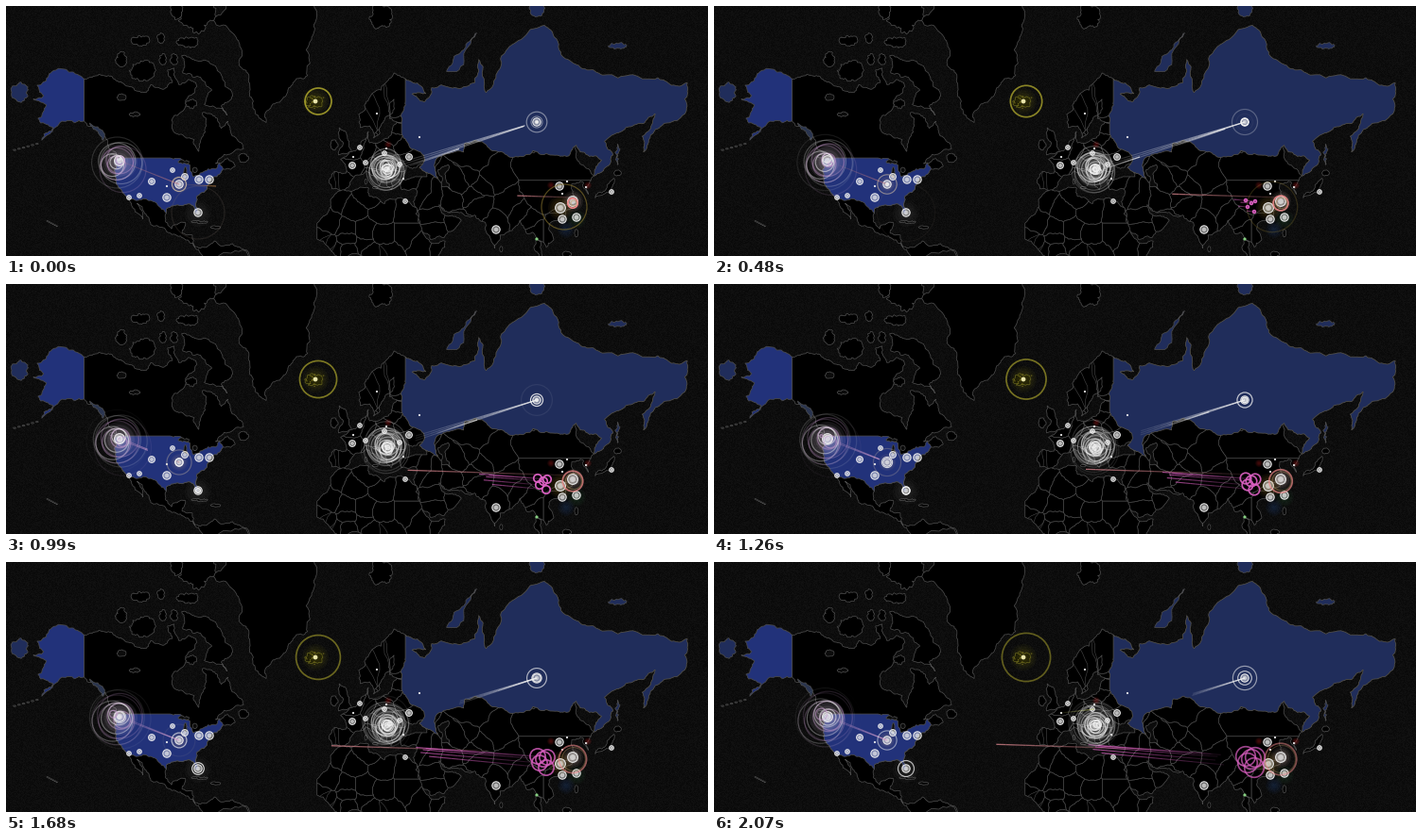
A matplotlib script for the animation above (2160 ms loop, 742x265 px).

```python
import numpy as np
import matplotlib.pyplot as plt
from matplotlib.animation import FuncAnimation
from matplotlib.collections import LineCollection
from matplotlib.colors import to_rgba
from matplotlib.patches import Circle, Polygon

W, H, DPI = 742, 265, 100
STEP, COUNT = 30, 72
PX = 72 / DPI
SEA, LAND, EDGE = "#0c0c0c", "#000000", "#4c4c4c"
RUSSIA, USA = "#202d5b", "#22327a"
WHITE, PINK, LILAC = "#f2f2f2", "#d95fc0", "#c79bcd"
GROWTH = 5.6  # ring growth in px per second

rng = np.random.default_rng(7)
fig = plt.figure(figsize=(W / DPI, H / DPI), dpi=DPI, facecolor=SEA)
ax = fig.add_axes([0, 0, 1, 1])
ax.set_xlim(0, W)
ax.set_ylim(H, 0)
ax.axis("off")
grain = rng.integers(9, 18, (H, W)).astype(np.uint8)
ax.imshow(np.dstack([grain] * 3), extent=(0, W, H, 0), aspect="auto",
          interpolation="nearest", zorder=0)


def project(flat):
    """Mercator, from lon, lat, lon, lat, ... to stage pixels."""
    lon, lat = np.reshape(flat, (-1, 2)).T
    y = 273 - 113.8 * np.arcsinh(np.tan(np.radians(lat)))
    return np.column_stack([5 + (lon + 180) * 715 / 360, y])


def rough(pts, amp):
    """Bend segments by midpoints; the same ends always bend the same way."""
    for _ in range(4):
        out = [pts[0]]
        for p, q in zip(pts[:-1], pts[1:]):
            d = q - p
            size = np.hypot(*d)
            if size > 2.5 and np.abs(d).min() > 1e-6:
                k = 13.7 * (p[0] + q[0]) + 7.9 * (p[1] + q[1])
                off = np.array([np.sin(k), np.cos(1.7 * k)])
                out.append((p + q) / 2 + amp * size * off)
            out.append(q)
        pts = np.array(out)
    return pts


def land(*flat, fill=LAND, edge=EDGE, amp=0.16):
    pts = project(flat)
    patch = Polygon(rough(np.vstack([pts, pts[:1]]), amp), facecolor=fill,
                    edgecolor=edge, linewidth=0.75 * PX, zorder=1)
    return ax.add_patch(patch)


def isle(lon, lat, w, h, **style):
    a = np.arange(9) * 2 * np.pi / 9 + 0.3
    land(*np.column_stack([lon + w * np.cos(a), lat + h * np.sin(a)]).ravel(),
         amp=0.24, **style)


# --- the Americas
north = (-141, 69.7, -128, 70.3, -124, 69.4, -115, 68, -108, 67, -105.5, 68.6,
         -98, 67.8, -94, 69, -96.5, 71.3, -93, 71.6, -90.5, 68.6, -85.5, 69.6,
         -81.5, 69, -82, 67, -87, 65.3, -94.4, 60.5, -92.5, 57, -82.3, 55,
         -80, 51.2, -79, 54.6, -76.5, 57.2, -78, 62.4, -70, 61, -68, 58.3,
         -64.5, 60.3, -60, 55.5, -56, 52.2, -66.5, 50.2, -71, 47, -64.5, 48.8,
         -60.5, 46, -67, 45)
east = (-67, 45, -70.5, 42, -74, 40.5, -76, 36.5, -81.2, 31.5, -80.3, 25.3,
        -83, 29.5, -89.5, 29.6, -97.2, 28, -97.2, 25.9)
central = (-97.7, 22, -94.5, 18.2, -90.4, 21, -87, 21.3, -88.8, 16, -83.3, 15,
           -82, 9, -77, 8.6, -71.5, 12, -62, 10.6, -51, 3, -78, 2, -80, 7.5,
           -87.5, 13, -95, 16, -105.5, 20.3, -112.8, 30.5, -109.8, 23, -115, 28.5)
west = (-117.1, 32.5, -122.5, 37.5, -124.3, 42, -124.5, 48.3, -123, 49)
coast = (-128, 52.5, -133.5, 58, -141, 60.3)
lakes = (-123, 49, -95.2, 49, -84.6, 46.4, -82.5, 42, -75, 45, -70.5, 45.2,
         -69, 47.3)
land(*north, *east, *central, *west, *coast)
land(*lakes, *east, -101.5, 29.5, -106.5, 31.8, -114.8, 32.5, *west, fill=USA)
land(-141, 69.7, -141, 60.3, -151, 60.2, -163.5, 54.8, -157.5, 58.6,
     -165.5, 61, -161, 64.3, -168, 65.6, -162.5, 66.4, -166, 68.5, -157, 71.2,
     fill=USA)
land(-138, 59.8, -130, 56, -131, 54.8, -136, 58, fill="#2a3550")
land(-73, 78.2, -58.5, 75.4, -54, 70.8, -53, 66.5, -49.5, 62, -44, 59.9,
     -40.5, 64.5, -32, 68, -22, 70.3, -19, 76.5, -18, 81, -65, 81)
land(-65, 61.8, -77, 64.4, -73, 67.5, -79, 70, -88.5, 70.8, -89, 73.6,
     -78, 72.8, -67, 69.5, -62, 66.6, -68, 64)

# --- Europe, Asia, Africa
norse = (30, 69.7, 24, 70.8, 13, 67, 5.2, 62, 6, 58.5, 11, 59, 13, 55.5,
         16.5, 57, 18.5, 60.3, 24, 65.6, 21.5, 61, 29, 60, 23.5, 59, 21, 55.5,
         11, 54, 10.4, 57.5, 8.4, 55)
south = (3.5, 51.4, -4.5, 48.5, -1.3, 45, -1.6, 43.4, -9.2, 43, -9, 37,
         -2, 36.8, 3.3, 42.5, 9, 44.3, 16, 38.2, 18.4, 40, 12.4, 44.8,
         19.4, 42, 22.5, 36.6, 23, 40.5, 29, 41, 30.5, 46, 39, 47, 41.5, 42,
         35, 42, 26.5, 40, 28, 36.7, 36, 36.5, 34.3, 31.3)
asia = (34.9, 29.5, 43.3, 12.8, 55, 17.2, 59.8, 22.5, 51.5, 24.7, 48, 30,
        57, 26.5, 67, 25, 72.7, 21, 77.5, 8.1, 80.3, 15, 91, 22.5, 94.5, 16,
        97.5, 16.5, 98.5, 8, 103.5, 2, 100, 13.3, 105, 8.7, 109, 12.5,
        106.5, 20.5, 114, 22.3, 121.8, 30, 119, 35, 118.5, 39, 124.5, 40,
        127.5, 34.7, 128, 39.5, 130.6, 42.3)
eurasia = land(*norse, *south, *asia, 120, 55, 60, 58, 33, 62.8)
africa = land(-6, 35.8, 10.5, 37.2, 11, 33.7, 19, 30.4, 22, 32.7, 32.3, 31.2,
              37, 21.5, 43, 11.6, 51.2, 11.8, 46, 1, 9.5, 1, 5, 5, -7.5, 4.4,
              -17, 13, -17, 21, -9.7, 31)
siberia = (130.6, 42.3, 135.5, 44.3, 140.5, 50, 136, 54.5, 153, 59.4,
           163, 62.2, 156, 56, 156.7, 51, 163, 58, 179.5, 62.8, 180, 69,
           160, 69.7, 130, 71.3, 113, 73.7, 104, 77.6, 81, 73.5, 73, 67,
           69, 73, 67, 69, 44, 68, 40, 65, 33.5, 66.7, 41, 66.8, 30, 69.7)
frontier = (30, 65, 28, 60, 28, 57, 32, 53, 40, 49.5, 37.5, 45.5, 47.5, 41.5,
            47, 49, 61, 51, 62, 54, 71, 54.3, 80, 51, 87, 49.2, 98, 51.5,
            107, 50, 117, 49.7, 121, 53.3, 127, 50, 134.5, 48.2)
land(*siberia, *frontier, fill=RUSSIA, edge="#55524a", amp=0.13)
land(52, 71, 56, 73.5, 68, 76.7, 56, 71, fill=RUSSIA)
land(47.3, 44.6, 53, 46.5, 51, 43, 53.8, 37, 49.3, 38, fill=SEA)
land(-5.5, 50, 1.3, 51.2, -2, 57.5, -5, 58.5, -3, 54, -5, 52)
land(141, 41.4, 140.5, 35.5, 131, 33, 136, 36)

for spot in ((-110, 71, 7, 1.8), (-121, 73, 3, 1.2), (-99, 73, 2, .9),
             (-93, 73, 2, .9), (-86, 75.5, 6, .7), (-81, 79, 9, 2.3),
             (-92, 79.5, 3, 1.3), (-111, 75.7, 5, .7), (-100, 76, 2, .7),
             (-84, 64.5, 3, 1), (-56, 49, 2.6, 1.6), (-126, 49.6, 1.6, .6),
             (-79.5, 21.7, 4.5, .7), (-71, 19, 2.7, .7), (17, 78.5, 6, 1.3),
             (-8, 53.3, 1.9, 1.6), (9, 40, .6, 1.1), (14, 37.5, 1.5, .5),
             (143, 43.4, 2, 1.1), (121, 23.7, .6, 1.2), (81, 7.7, .8, 1.5),
             (121, 16, 1, 2), (116, 5, 2.5, 1.5)):
    isle(*spot)
for spot in ((143, 50, .6, 3.6), (100, 79.3, 4, .8), (143, 75, 5, .4),
             (-175, 67, 4.5, 2)):
    isle(*spot, fill=RUSSIA)
for spot in ((-88, 47.6, 3, .7), (-87, 44, .8, 1.8), (-82, 44.6, 1.3, 1),
             (-114, 62, 3, .6), (-121, 66, 2.5, .7)):
    isle(*spot, fill=SEA)
for k in range(6):
    isle(-166 - 2.4 * k, 53.7 - .4 * k, .7, .2)
    isle(-155.5 - k, 19.6 + .5 * k, .4, .2)
isle(-18.8, 65, 4.8, 1.4, fill="#0a0a02", edge="#5b5a1c")


# --- country borders: cells around the middle of each country
def cell(site, others):
    """Polygon of all points nearer to site than to any of the others."""
    poly = site + np.array([(-1, -1), (1, -1), (1, 1), (-1, 1)]) * 90
    for o in others:
        n, mid = o - site, (o + site) / 2
        side = (poly - mid) @ n
        out = []
        for p, q, a, b in zip(poly, np.roll(poly, -1, 0), side, np.roll(side, -1)):
            if a <= 0:
                out.append(p)
            if a * b < 0:
                out.append(p + (q - p) * a / (a - b))
        poly = np.array(out)
    return np.vstack([poly, poly[:1]])


europe = (-8, 39.7, -4, 40, 2.5, 46.8, 4.5, 52, 10, 51, 13, 42.5, 14, 47.5,
          15.5, 49.8, 19.5, 52, 19.3, 47, 25, 46, 20.5, 44, 25.3, 42.7, 22, 39.5,
          24, 55.5, 25.5, 58.5, 28, 53.5, 31, 49, 9, 61.5, 16, 62.5, 26.5, 63.5)
orient = (33, 39, 38, 35, 43.5, 33, 45, 24, 48, 16, 57, 21, 54, 32.5, 59, 39.5,
          64, 42, 67, 48, 74.5, 41.3, 70, 38.7, 66, 34, 69, 29.5, 79, 22,
          84, 28.3, 90, 24, 96, 21, 101, 16, 106, 16, 104, 34, 104, 46.5)
sahara = (-6, 32, 3, 28, 9.5, 34, 17.5, 27, 30, 26.5, -10, 20.5, -2, 17.5,
          9, 17.5, 18.5, 15.5, 30, 15.5, 39, 8.5, 46, 6, 8, 9.5, 12.5, 5.5,
          20.5, 6.5, -11, 10.5, -5.5, 7.5, -1, 8, -1.5, 12.3, -14.5, 14.5)
for region, table in ((eurasia, europe + orient), (africa, sahara)):
    sites = project(table)
    for k, site in enumerate(sites):
        pts = rough(cell(site, np.delete(sites, k, 0)), 0.11)
        line, = ax.plot(*pts.T, color="#454545", lw=0.6 * PX, zorder=1)
        line.set_clip_path(region)
        line.set_zorder(region.get_zorder())
# keep coloured land and water above the cells
for patch in ax.patches:
    if patch not in (eurasia, africa):
        patch.set_zorder(1.5)


# --- marks that stay put
def disc(x, y, r, colour, alpha, z=4):
    ax.add_patch(Circle((x, y), r, facecolor=colour, edgecolor="none",
                        alpha=alpha, zorder=z))


def glow(x, y, r, colour, alpha):
    for k in range(1, 7):
        disc(x, y, r * k / 6, colour, alpha / 6, z=3)


glow(120, 165, 19, "#e6d3ea", 0.55)
glow(403, 173, 20, "#ffffff", 0.5)
glow(183, 189, 9, "#e0b890", 0.35)
glow(203, 220, 14, "#888888", 0.2)
glow(327, 101, 14, "#b0a820", 0.28)
glow(586, 214, 13, "#b89030", 0.4)
glow(603, 226, 10, "#30703c", 0.3)
glow(592, 237, 9, "#2858a0", 0.3)
glow(599, 207, 11, "#ffd8d0", 0.4)
for x, y in ((615, 190), (576, 190), (404, 147)):
    glow(x, y, 4, "#b02020", 0.5)
disc(561, 247, 1.6, "#8fe08a", 0.9)
for x, y in rng.normal((325, 101), 4, (16, 2)):
    disc(x, y, 0.7, "#8c8422", 0.7)
disc(327, 101, 2.4, "#f4f0b4", 0.95)

# cities by radius
cities = {
    2.3: ((176, 174), (141, 201), (130, 203), (374, 150), (380, 166), (400, 156),
          (422, 207), (416, 168), (640, 197)),
    3.4: ((154, 186), (189, 181), (366, 169), (426, 160)),
    4.2: ((204, 184), (215, 184), (170, 203), (203, 219), (183, 189), (518, 237),
          (585, 191), (588, 226), (603, 224), (561, 123)),
    5.4: ((586, 214), (599, 207), (120, 164), (403, 173)),
}
for r, places in cities.items():
    for x, y in places:
        disc(x, y, r, WHITE, 0.45)
        disc(x, y, r * 0.55, WHITE, 0.6)
        ax.add_patch(Circle((x, y), r, fill=False, edgecolor=WHITE, alpha=0.9,
                            linewidth=1.1 * PX, zorder=5))
for x, y in ((392, 114), (367, 160), (437, 139), (420, 183), (593, 186),
             (613, 192), (170, 191), (588, 199), (402, 151)):
    disc(x, y, 1.1, WHITE, 0.95)


# --- rings that grow and fade
rings = []


def ring(x, y, r0, end, colour=WHITE, lw=1.2, alpha=1.2):
    c = Circle((x, y), 1, fill=False, edgecolor=colour, linewidth=lw * PX, zorder=6)
    ax.add_patch(c)
    rings.append((c, r0, end, alpha))


for r0 in np.linspace(-9, 20, 22):
    ring(*rng.normal((403, 173), 2.3), r0, 28, alpha=0.85)
for k, r0 in enumerate(rng.permutation(np.linspace(-8, 27, 15))):
    ring(*rng.normal((118, 166), 3.2), r0, 34, (WHITE, LILAC)[k % 2], alpha=0.75)
ring(330, 101, 14, 44, "#b5ae2e", 1.7)
for r0, end in ((10.8, 17.5), (6, 9), (1, 24), (-4.3, 18)):
    ring(561, 123, r0, end)
ring(183, 189, 7.5, 18, "#e8cfa8")
ring(183, 189, -1.5, 18)
ring(203, 219, 28, 33, "#8a7a70")
ring(203, 219, -3.1, 22)
ring(590, 213, 24, 29, "#8f7a30", alpha=3.5)
ring(599, 209, 5.2, 29, "#f08a8a", 1.7)
ring(600, 209, 3, 27, "#c9a06a", alpha=0.6)
hub = ((562, 206), (572, 207), (564, 213), (571, 218), (568, 209))
for x, y in hub:
    ring(x, y, -1.3, 26, PINK, 1.7)


# --- beams that fly from one place to another
beams = []
PARTS = np.linspace(0, 1, 17)


def beam(start, end, t0, speed, length, colour=WHITE, lw=1.1, alpha=0.7):
    rgba = np.tile(to_rgba(colour), (len(PARTS) - 1, 1))
    rgba[:, 3] = alpha * (0.12 + 0.88 * PARTS[1:])
    lines = LineCollection([], colors=rgba, linewidths=lw * PX, zorder=5)
    ax.add_collection(lines)
    beams.append((lines, np.array(start), np.array(end), t0, speed, length))


omsk, denver, seattle = (561, 123), (183, 189), (120, 164)
for y in (170, 173, 176):
    beam((403, y), omsk, -2.14, 71, 191, alpha=0.6)
beam((405, 177), omsk, -0.58, 135, 55, lw=1.5)
beam((405, 175), omsk, 0, 99, 45, lw=1.3)
beam(seattle, denver, -1, 100, 135, "#c07880")
beam(denver, (222, 191), -0.5, 100, 42, "#c88a50")
for y in (163, 165):
    beam((120, y), denver, 0.67, 100, 190, "#d9a0d0", alpha=0.6)
beam((600, 203), (290, 193), -0.51, 117, 165, "#d08088", 1.3, 0.8)
for x, y in hub:
    beam((x, y), (250, 183 + (y - 206) / 3), 0.35 + (y - 206) / 250, 97, 130, PINK)
beam((367, 160), (402, 156), 1.7, 100, 45, "#b8c060")


def update(i):
    t = i * STEP / 1000
    for c, r0, end, alpha in rings:
        r = r0 + GROWTH * t
        c.set_radius(max(r, 0.01))
        c.set_alpha(float(np.clip(alpha * (1 - r / end), 0, 1)) if r > 0 else 0)
    for lines, a, b, t0, speed, length in beams:
        dist = np.hypot(*(b - a))
        head = speed * (t - t0)
        lo, hi = np.clip([head - length, head], 0, dist)
        path = a + np.outer(lo + (hi - lo) * PARTS, (b - a) / dist)
        lines.set_segments(np.stack([path[:-1], path[1:]], axis=1) if hi > lo else [])
    return []


anim = FuncAnimation(fig, update, frames=COUNT, interval=STEP, repeat=True,
                     repeat_delay=0, blit=False)
plt.show()
```
